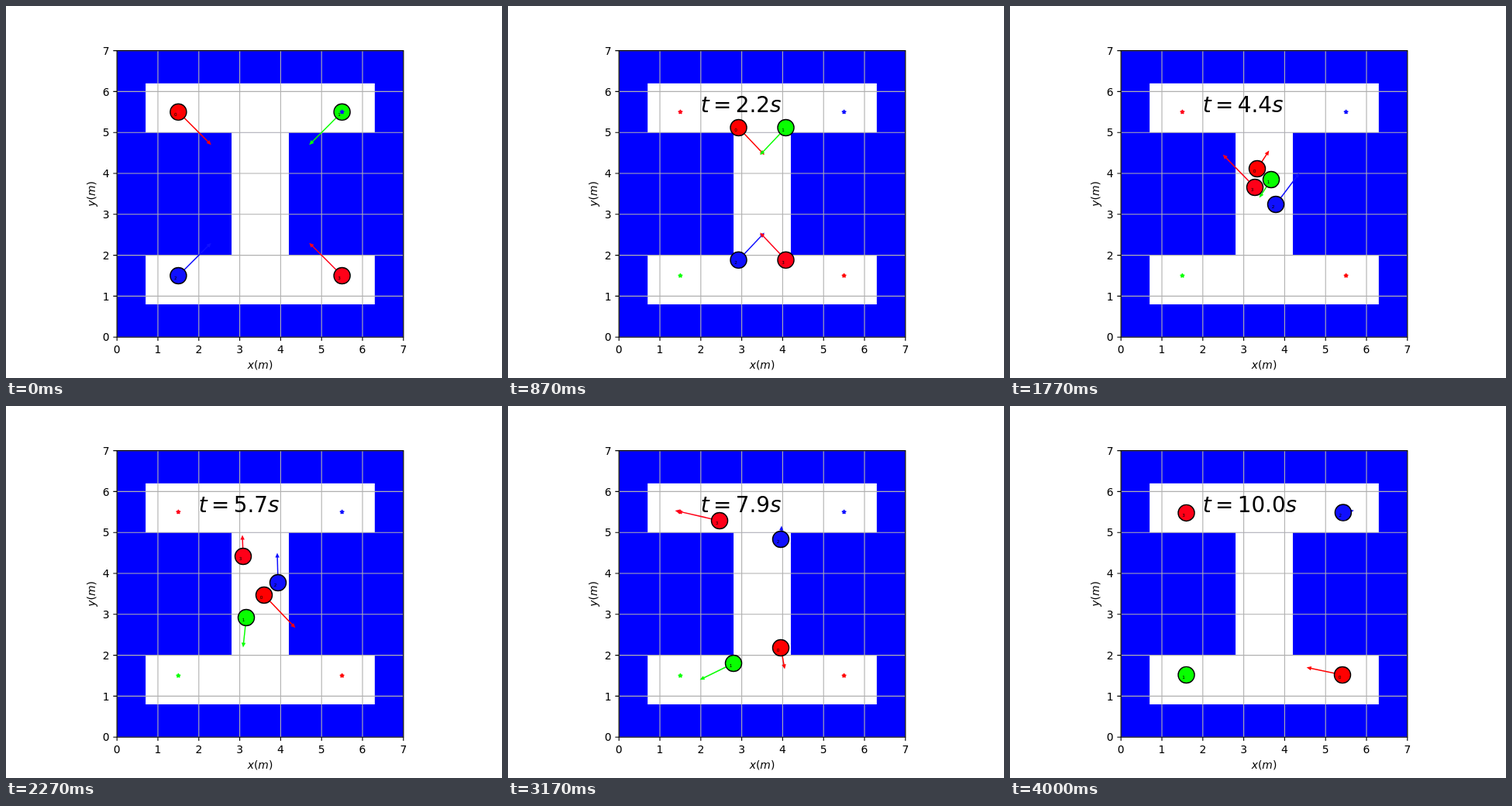
Write an HTML page that moves like this. It is 640x480 px and loops after 4030 ms.

```html
<!DOCTYPE html>
<html lang="en">
<head>
<meta charset="utf-8">
<title>Four robots in a corridor</title>
<style>
  html, body { margin: 0; width: 100%; height: 100%; overflow: hidden; background: #fff; }
  svg { display: block; width: 640px; height: 480px; font-family: "DejaVu Sans", sans-serif; }
  .axes { font-size: 13.89px; }
  .clock { font-size: 27.78px; }
  .tag { font-size: 5.6px; }
  .it { font-style: italic; }
</style>
</head>
<body>
<svg id="stage" viewBox="0 0 640 480"></svg>
<script>
const LOOP = 4030, LAST_STEP = 100, UNIT = 52.8;
const px = x => 143.2 + UNIT * x;
const py = y => 427.2 - UNIT * y;
const CENTER = [px(3.5), py(3.5)], CORNER = 2 * UNIT, CRUISE = [57, 12];

// Each robot starts in the corner given by `side` and heads for the opposite one.
// `turns` are the pose [x, y, vx, vy] at the shared TURN_STEPS inside the corridor.
const TURN_STEPS = [34, 44, 57, 79];
const robots = [
  { color: "#ff0000", side: [-1, -1], arrival: 100.1, turns: [
    [313, 201, 0, 48], [319, 210, 15, -23], [333, 244, 40, 42], [352, 312, 5, 27]] },
  { color: "#08ff00", side: [1, -1], arrival: 92, turns: [
    [337, 204, -5, 48], [337, 224, -15, 23], [310, 273, -4, 38], [291, 332, -43, 21]] },
  { color: "#1010ff", side: [-1, 1], arrival: 100.7, turns: [
    [319, 290, 19, -31], [343, 256, 30, -40], [351, 228, -1, -38], [352, 172, 1, -17]] },
  { color: "#ff0018", side: [1, 1], arrival: 87, turns: [
    [339, 275, -1, -49], [316, 234, -41, -42], [306, 194, -1, -27], [273, 148, -57, -13]] }
];

function buildPath(robot) {
  const mirror = (offset, speed) => ({
    pos: robot.side.map((s, k) => CENTER[k] + s * offset[k]),
    vel: robot.side.map((s, k) => -s * speed[k])
  });
  const runIn = seconds =>
    mirror(CRUISE.map(v => v * (seconds + 0.09) - CORNER), CRUISE.map(v => -v));
  const turns = robot.turns.map(([x, y, vx, vy], i) =>
    ({ step: TURN_STEPS[i], pos: [x, y], vel: [vx, vy] }));
  robot.goal = mirror([-CORNER, -CORNER], [0, 0]).pos;
  robot.path = [
    { step: 0, ...mirror([CORNER, CORNER], [42, 42]) },
    { step: 1, ...mirror([102, 104.6], [34, 6]) },
    { step: 13, ...mirror([61.5, 96], [34, 8]) },
    { step: 22, ...mirror([30.5, 85.4], [33, 35]) },
    ...turns,
    { step: robot.arrival - 6, ...runIn(0.6) },
    { step: robot.arrival, ...runIn(0) }
  ];
}

// Cubic Hermite position and velocity; ten steps make one second.
function poseAt(path, step) {
  const next = path.findIndex(key => key.step > step);
  if (next < 0) return { pos: path[path.length - 1].pos, vel: [0, 0] };
  const a = path[next - 1], b = path[next];
  const span = (b.step - a.step) / 10, s = (step - a.step) / (b.step - a.step);
  const pos = [], vel = [];
  for (const k of [0, 1]) {
    const d = b.pos[k] - a.pos[k], v0 = a.vel[k] * span, v1 = b.vel[k] * span;
    const c2 = 3 * d - 2 * v0 - v1, c3 = v0 + v1 - 2 * d;
    pos.push(a.pos[k] + s * (v0 + s * (c2 + s * c3)));
    vel.push((v0 + s * (2 * c2 + 3 * s * c3)) / span);
  }
  return { pos, vel };
}

const stage = document.getElementById("stage");

function add(tag, attrs, text) {
  const el = document.createElementNS("http://www.w3.org/2000/svg", tag);
  set(el, attrs);
  if (text !== undefined) el.textContent = text;
  stage.append(el);
  return el;
}

function set(el, attrs) {
  for (const name in attrs) el.setAttribute(name, attrs[name]);
}

function room(x0, y0, x1, y1, fill) {
  add("rect", { x: px(x0), y: py(y1), width: UNIT * (x1 - x0), height: UNIT * (y1 - y0), fill });
}

function starPoints([x, y]) {
  return Array.from({ length: 10 }, (_, i) => {
    const r = i % 2 ? 1.06 : 2.78, a = i * Math.PI / 5;
    return `${x + r * Math.sin(a)},${y - r * Math.cos(a)}`;
  }).join(" ");
}

function axisLabel(name, attrs) {
  const label = add("text", { class: "axes", "text-anchor": "middle", ...attrs });
  label.innerHTML = `<tspan class="it">${name}</tspan>(<tspan class="it">m</tspan>)`;
}

function buildScene() {
  room(0, 0, 7, 7, "#00f");
  room(0.7, 5, 6.3, 6.2, "#fff");
  room(2.8, 2, 4.2, 5, "#fff");
  room(0.7, 0.8, 6.3, 2, "#fff");

  const line = (d, stroke) => add("path", { d, stroke, fill: "none", "stroke-width": 1.11 });
  for (let i = 0; i <= 7; i++) {
    const x = px(i), y = py(i);
    line(`M${x} ${py(7)}V${py(0)}M${px(0)} ${y}H${px(7)}`, "#b0b0b0");
    line(`M${x} ${py(0)}v4.86M${px(0)} ${y}h-4.86`, "#000");
    add("text", { class: "axes", x, y: 447.6, "text-anchor": "middle" }, i);
    add("text", { class: "axes", x: 133.5, y: y + 5.2, "text-anchor": "end" }, i);
  }

  for (const r of robots) {
    r.shaft = add("path", { stroke: r.color, "stroke-width": 1.5 });
    r.head = add("path", { fill: r.color });
  }
  for (const r of robots) {
    r.body = add("circle", { r: 0.2 * UNIT, fill: r.color, stroke: "#000", "stroke-width": 1.39 });
    add("polygon", {
      points: starPoints(r.goal), fill: r.color, stroke: r.color,
      "stroke-width": 1.39, "stroke-linejoin": "bevel"
    });
  }
  line(`M${px(0)} ${py(0)}V${py(7)}H${px(7)}V${py(0)}Z`, "#000");
  robots.forEach((r, i) => { r.tag = add("text", { class: "tag" }, i); });

  axisLabel("x", { x: 328, y: 468 });
  axisLabel("y", { transform: "translate(115 242.4) rotate(-90)" });
}

robots.forEach(buildPath);
buildScene();
const clock = add("text", { class: "clock", x: 248.8, y: 137.3 });
clock.innerHTML = '<tspan class="it">t</tspan><tspan dx="5.4">=</tspan>' +
  '<tspan dx="5.4" id="seconds"></tspan><tspan class="it">s</tspan>';
const seconds = document.getElementById("seconds");

function place(robot, step) {
  const { pos: [x, y], vel: [vx, vy] } = poseAt(robot.path, step);
  const length = Math.hypot(vx, vy), angle = Math.atan2(vy, vx) * 180 / Math.PI;
  const transform = `translate(${x} ${y}) rotate(${angle})`;
  set(robot.body, { cx: x, cy: y });
  set(robot.tag, { x: x - 5.3, y: y + 5.4 });
  set(robot.shaft, { transform, d: length ? `M0 0H${length - 4}` : "" });
  set(robot.head, { transform, d: length ? `M${length + 0.5} 0l-6 -2.7v5.4Z` : "" });
}

// Steps of 40 ms shown on a 30 Hz grid, rounded to 10 ms.
const startOf = step => Math.round(Math.round(step * 1.2) * 10 / 3) * 10;

function render(ms) {
  let step = LAST_STEP;
  while (step > 0 && startOf(step) > ms) step--;
  for (const r of robots) place(r, step);
  set(clock, { visibility: step ? "visible" : "hidden" });
  seconds.textContent = (step / 10).toFixed(1);
}

let begin;
function tick(now) {
  begin ??= now;
  render((now - begin) % LOOP);
  requestAnimationFrame(tick);
}
render(0);
requestAnimationFrame(tick);
</script>
</body>
</html>
```
